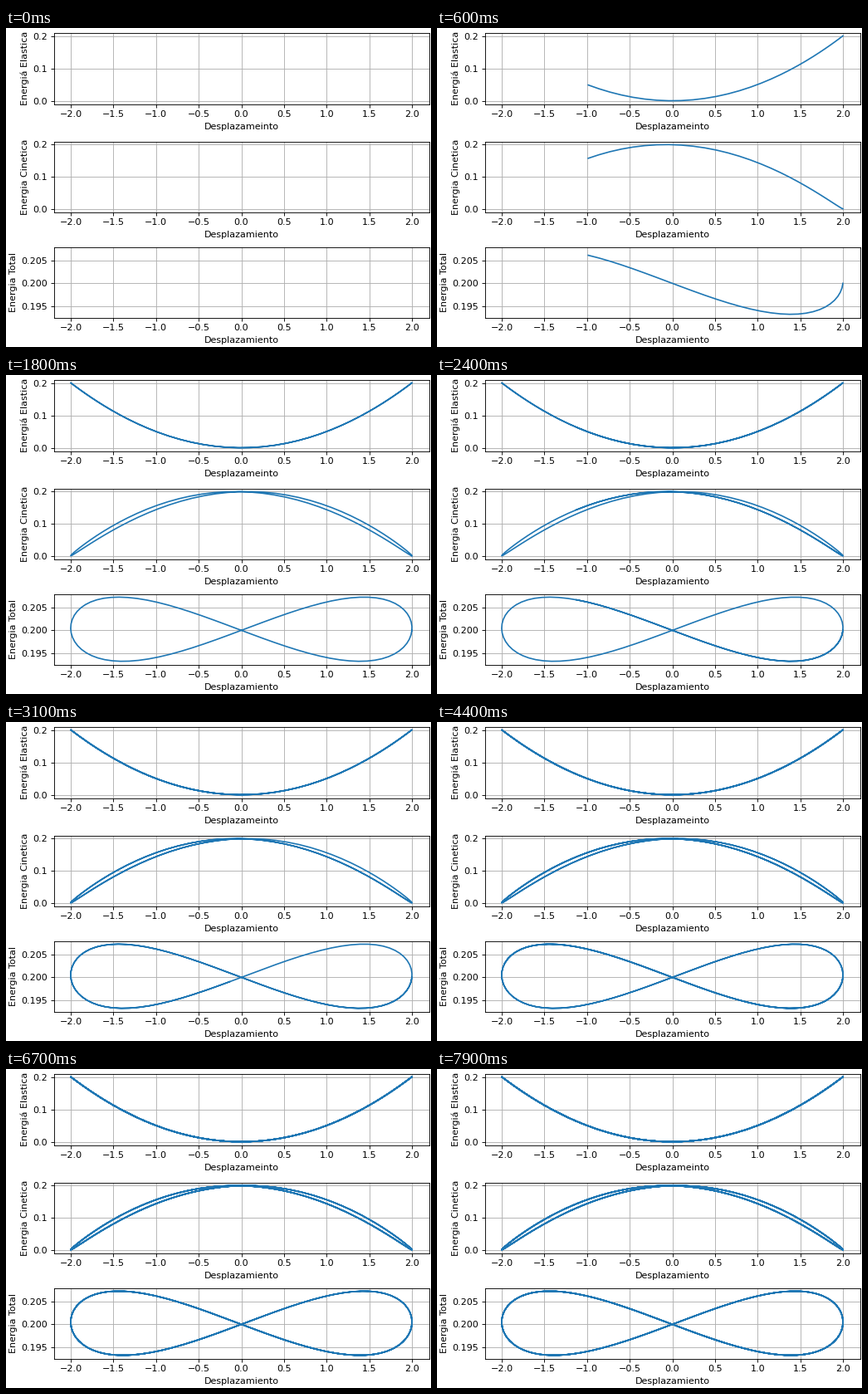
Recreate the animation shown at these times as a matplotlib script. Size 512 px wide and 384 px high, loop 8 s.

```python
import numpy as np
import matplotlib.pyplot as plt
from matplotlib.animation import FuncAnimation

W, H, DPI = 512, 384, 80
FRAMES, INTERVAL, STEPS = 80, 100, 5
K, MASS, DT = 0.1, 0.2, 0.1


def simulate(n, x=2.0, v=0.0):
    """Semi-implicit Euler steps of a mass on a spring."""
    states = []
    for _ in range(n):
        states.append((x, v))
        v -= K / MASS * x * DT
        x += v * DT
    return np.array(states).T


plt.rcParams.update({"font.family": "DejaVu Sans", "font.size": 10})
x, v = simulate(FRAMES * STEPS)
elastic = K * x**2 / 2
kinetic = MASS * v**2 / 2

# energy, y label, x label, top and bottom in pixels, y ticks
panels = [
    (elastic, "Energiá Elastica", "Desplazameinto", 5.5, 91.5, [0, 0.1, 0.2]),
    (kinetic, "Energia Cinetica", "Desplazamiento", 136.5, 221.5, [0, 0.1, 0.2]),
    (elastic + kinetic, "Energia Total", "Desplazamiento", 263.5, 348.5,
     [0.195, 0.2, 0.205]),
]
LEFT, RIGHT = 57.5, 509.5

fig = plt.figure(figsize=(W / DPI, H / DPI), dpi=DPI, facecolor="white")
lines = []
for energy, ylabel, xlabel, top, bottom, yticks in panels:
    ax = fig.add_axes([LEFT / W, 1 - bottom / H,
                       (RIGHT - LEFT) / W, (bottom - top) / H])
    line, = ax.plot(x, energy, color="C0", lw=1.5)
    ax.set_xlim(-2.2, 2.2)
    ax.set_ylim(ax.get_ylim())
    ax.set_xticks(np.arange(-2, 2.1, 0.5))
    ax.set_yticks(yticks)
    ax.set_xlabel(xlabel)
    ax.set_ylabel(ylabel)
    ax.grid(True)
    lines.append(line)


def update(frame):
    n = frame * STEPS
    for line, panel in zip(lines, panels):
        line.set_data(x[:n], panel[0][:n])
    return lines


anim = FuncAnimation(fig, update, frames=FRAMES, interval=INTERVAL,
                     init_func=lambda: update(0), repeat=True, repeat_delay=0)
plt.show()
```
